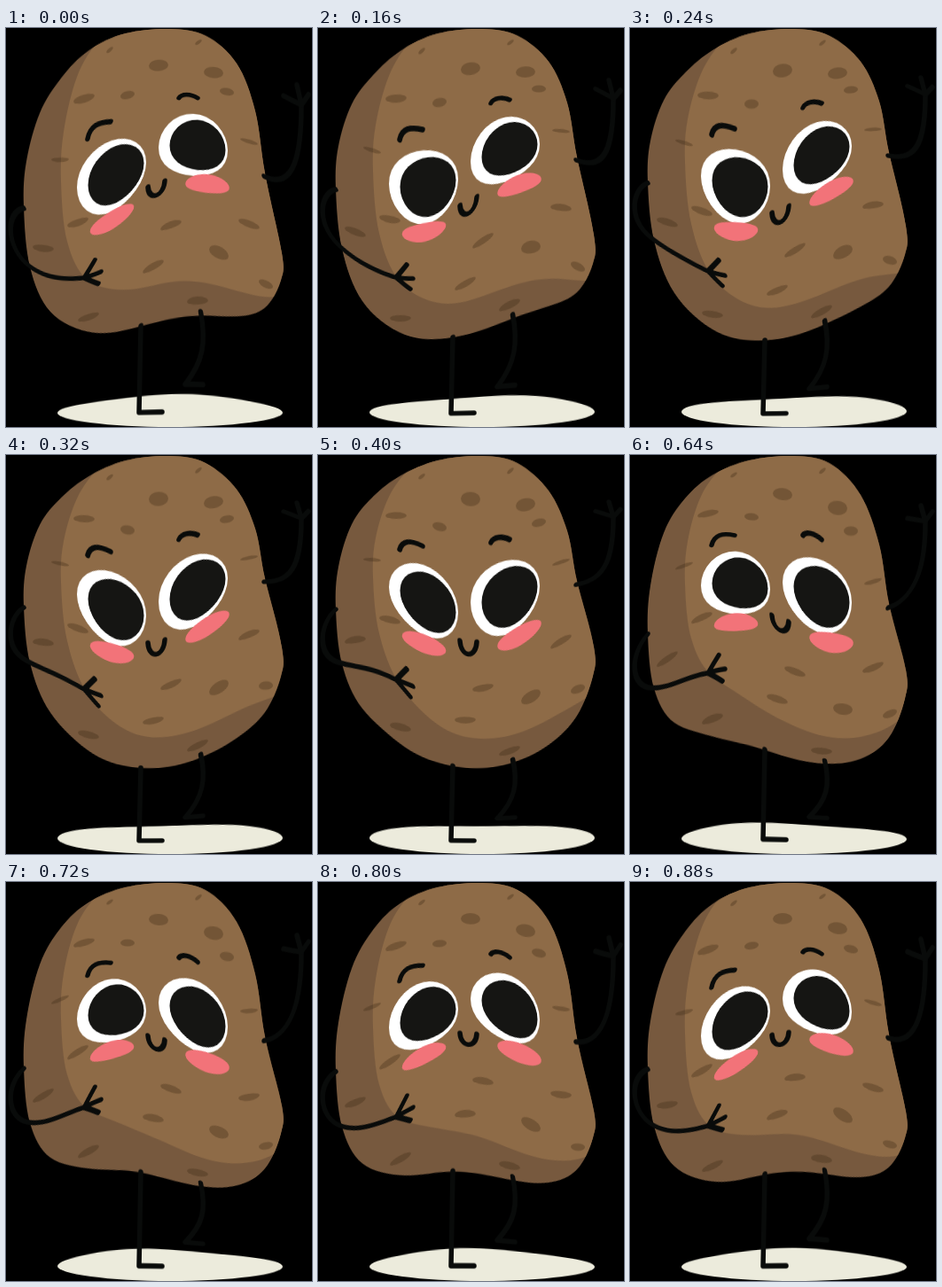
An HTML page with a canvas that plays this animation: 345x450 px, repeating every 0.96 s.

```html
<!DOCTYPE html>
<html lang="en">
<head>
<meta charset="utf-8">
<title>Wobbling potato</title>
<style>
  html, body { margin: 0; height: 100%; overflow: hidden; background: #000; }
  canvas { display: block; }
</style>
</head>
<body>
<canvas id="stage" width="345" height="450"></canvas>
<script>
const W = 345, H = 450, STEPS = 12, STEP_MS = 80;
const SWING = 22, WAVELENGTH = 278, START = 65;
const LINE = '#090b0a', LIGHT = '#8e6b47', DARK = '#77593e', BLUSH = '#f27379';

const stage = document.getElementById('stage').getContext('2d');
const still = document.createElement('canvas');
still.width = W;
still.height = H;
const g = still.getContext('2d', { willReadFrequently: true });

// Closed Catmull-Rom curve
function blob(points) {
  const n = points.length, at = i => points[(i + n) % n];
  const path = new Path2D();
  path.moveTo(...points[0]);
  for (let i = 0; i < n; i++) {
    const [a, b, c, d] = [-1, 0, 1, 2].map(k => at(i + k));
    path.bezierCurveTo(
      b[0] + (c[0] - a[0]) / 6, b[1] + (c[1] - a[1]) / 6,
      c[0] - (d[0] - b[0]) / 6, c[1] - (d[1] - b[1]) / 6, ...c);
  }
  return path;
}

function oval(color, x, y, rx, ry = rx, degrees = 0) {
  g.fillStyle = color;
  g.beginPath();
  g.ellipse(x, y, rx, ry, degrees * Math.PI / 180, 0, 2 * Math.PI);
  g.fill();
}

const line = d => g.stroke(new Path2D(d));

function spots(rx, ry, degrees, places) {
  for (const [x, y] of places) oval('rgba(60,40,20,.32)', x, y, rx, ry, degrees);
}

function drawBody() {
  const body = blob([
    [185, 1], [135, 6], [93, 24], [62, 51], [38, 87], [23, 140], [20, 190],
    [27, 256], [50, 305], [98, 334], [152, 341.5], [210, 340], [260, 330],
    [292, 309], [310, 270], [311, 238], [292, 156], [281, 92], [260, 41], [225, 9]]);
  g.fillStyle = DARK;
  g.fill(body);

  // The lit side is the same shape moved up and to the right.
  g.save();
  g.clip(body);
  g.translate(42, -37);
  g.fillStyle = LIGHT;
  g.fill(body);
  g.restore();

  spots(12, 4, -9, [
    [88, 72], [81, 199], [42, 230], [93, 314], [166, 282], [186, 242], [274, 221], [216, 324]]);
  spots(10, 2.3, -4, [[61, 131], [274, 128]]);
  spots(11, 7, 0, [[172, 45], [234, 54], [240, 268]]);
  spots(8, 4.5, 0, [[249, 76], [293, 281], [137, 76]]);
  spots(4.5, 1.8, -40, [[117, 24], [217, 17]]);
}

function drawFace() {
  for (const [x, y] of [[119, 160.5], [211, 147]]) {
    oval('#fff', x, y, 39);
    oval('#151513', x + 5, y, 31.5);
  }
  oval(BLUSH, 119.5, 209, 25, 10.5, -8);
  oval(BLUSH, 227, 193, 25, 11, -8);
  line('M92 112.5C95 100 104 98 118 101');
  line('M195 87.5C198 82 208 82 216 87.5');
  line('M160 190C161 208 178 208 179 189');
}

function drawLimbs() {
  line('M152 341L150 434H176');
  line('M219.5 335C226 365 222 385 202 406.5H222');
  line('M20 192C0 205 -2 245 28 256C45 263 65 262 88 264.5');
  line('M100 247L88 264.5L107 263M88 264.5L104 276');
  line('M291 160C325 162 333 125 333 77');
  line('M313 70L333 77L328 58M333 77L341 67');
}

oval('#ecebdc', 185, 433, 127, 17);
drawBody();
g.strokeStyle = LINE;
g.lineWidth = 5.5;
g.lineCap = g.lineJoin = 'round';
drawFace();
drawLimbs();

const source = g.getImageData(0, 0, W, H).data;
const output = stage.createImageData(W, H);

// A wave runs to the right; its vertical swing fades at the top and bottom.
function warp(step) {
  const out = output.data;
  const wave = Array.from({ length: W }, (_, x) =>
    Math.cos(2 * Math.PI * (step / STEPS - (x - START) / WAVELENGTH)));
  for (let y = 0; y < H; y++) {
    const swing = SWING * Math.sin(Math.PI * y / H) ** 1.4;
    for (let x = 0; x < W; x++) {
      const from = Math.max(0, Math.min(H - 1.001, y - swing * wave[x]));
      const row = Math.floor(from), mix = from - row;
      const i = (row * W + x) * 4, j = i + W * 4, o = (y * W + x) * 4;
      const a = source[i + 3] / 255 * (1 - mix), b = source[j + 3] / 255 * mix;
      for (let k = 0; k < 3; k++) out[o + k] = source[i + k] * a + source[j + k] * b;
      out[o + 3] = 255;
    }
  }
  stage.putImageData(output, 0, 0);
}

let shown = -1;
function tick() {
  const step = Math.floor(performance.now() / STEP_MS) % STEPS;
  if (step !== shown) warp(shown = step);
  requestAnimationFrame(tick);
}
tick();
</script>
</body>
</html>
```
